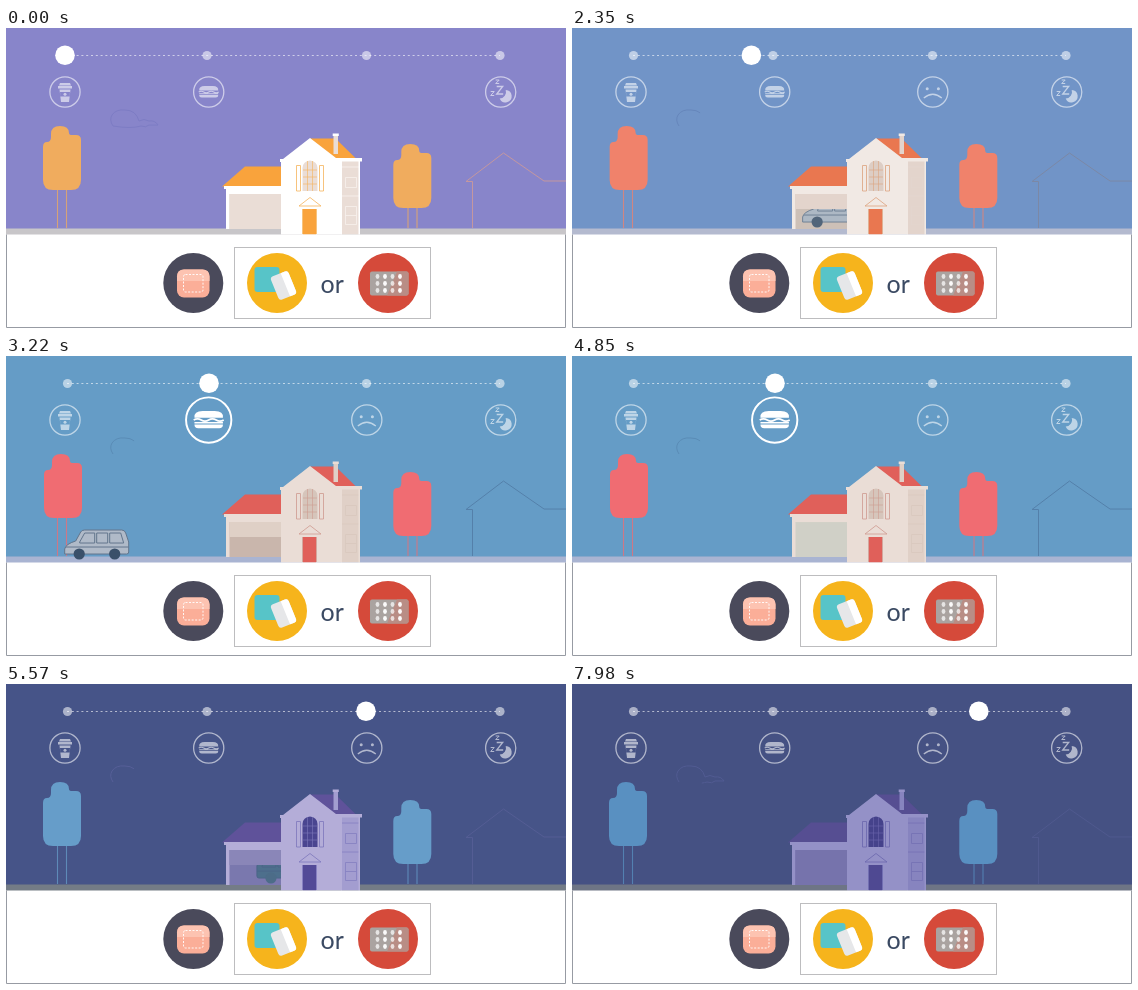
Recreate the animation shown at these times as an HTML page. Size 560 by 300 pixels, loop 8 s.

```html
<!DOCTYPE html>
<html lang="en">
<head>
<meta charset="utf-8">
<title>Day timeline</title>
<style>
html, body { margin: 0; width: 100%; height: 100%; overflow: hidden; }
svg { display: block; width: 100%; height: 100%; }
.sky { fill: var(--sky); }
.tree { fill: var(--tree); }
.trunk { fill: none; stroke: var(--tree); stroke-width: 1.1; opacity: .75; }
.wall { fill: var(--wall); }
.shade { fill: var(--shade); }
.roof { fill: var(--roof); }
.door { fill: var(--door); }
.win { fill: var(--win); }
.trim { fill: none; stroke: var(--line); stroke-width: .8; }
.side { fill: none; stroke: var(--side); stroke-width: .8; }
.ground { fill: var(--ground); }
.far { fill: none; stroke: var(--far); }
.cloud { fill: none; stroke: var(--cloud); }
.panel { fill: var(--panel); }
.inside { fill: var(--inside); }
.body { fill: var(--car); stroke: var(--edge); }
.glass { fill: none; stroke: var(--edge); }
.tyre { fill: var(--tyre); }
.icon { fill: #fff; }
.ring, .ln { fill: none; stroke: #fff; stroke-width: 1.3; }
</style>
</head>
<body>
<svg id="stage" viewBox="0 0 560 300" preserveAspectRatio="none">
  <defs>
    <path id="crown" class="tree" d="M45 106Q45 98 54 98T63 105Q63 107 66 107H70Q75 107 75 112V152Q75 162 65 162H47Q37 162 37 152V119Q37 114 41 114T45 109z"/>
    <linearGradient id="glow">
      <stop offset="0" stop-color="#fff" stop-opacity=".75"/>
      <stop offset="1" stop-color="#fff" stop-opacity=".3"/>
    </linearGradient>
    <clipPath id="road"><path d="M0 0H300V300H0z"/></clipPath>
  </defs>

  <rect class="sky" width="560" height="300"/>
  <path class="cloud" id="cloud" pathLength="100" d="M107 98q-4-6-1-11q4-6 13-5q11 0 14 11q5-3 10 0q6-1 9 4H143q-3 3-8 1q-10 3-28 0z"/>
  <path class="far" d="M560 153H538L497.500 125L460 153.500H466.500V200"/>

  <rect class="ground" y="200.500" width="560" height="7"/>
  <path class="trunk" d="M51.500 160V200M60.500 160V200M402 178V200M411 178V200"/>
  <use href="#crown" id="leftTree"/>
  <use href="#crown" x="350.300" y="18"/>

  <path class="wall" d="M220 157H276V201H220z"/>
  <rect class="inside" x="223.500" y="166" width="52" height="35"/>
  <g clip-path="url(#road)">
    <g id="car">
      <g id="turn">
        <path id="beam" fill="url(#glow)" d="M2 16L-54 6V26L2 20z"/>
        <path class="body" d="M1 25V20Q2 15 12 12L17 3Q18 1 21 1H58Q61 1 62 4L65 13V23Q65 25 63 25z"/>
        <path class="glass" d="M16 13L21 4H31V14H16zM33 4H44V14H33zM46 4H57L60 14H46zM2 18H65"/>
        <circle class="tyre" cx="15.500" cy="25" r="5.600"/>
        <circle class="tyre" cx="51" cy="25" r="5.600"/>
      </g>
    </g>
  </g>
  <rect class="panel" id="shutter" x="223.500" y="166" width="52" height="35"/>
  <path class="roof" d="M216 158.500L239 138.500H276V158.500z"/>
  <path class="wall" d="M218 158H276V161H218z"/>

  <path class="shade" d="M335 131H354V206.500H335z"/>
  <path class="side" d="M339.500 149.500H350.500V159.500H339.500zM339.500 178.500H350.500V196.500H339.500zM339.500 187.500H350.500M336 139H354M336 168H354"/>
  <path class="roof" d="M304 110.500H329.500L350.500 131H326z"/>
  <path class="shade" d="M327.500 107H332V126H327.500z"/>
  <path class="wall" d="M326.700 105.500H332.800V108H326.700z"/>
  <path class="wall" d="M304 110L330 130H356V133.500H354V206.500H352.500V133.500H336V206.500H275V134H274V131H277z"/>
  <path class="win" d="M296.500 163V140Q297 133 304 132.500Q311 133 311.500 140V163z"/>
  <path class="trim" style="stroke-width:.6" d="M301.500 133V163M306.500 133V163M297 142H311M297 149H311M297 156H311"/>
  <path class="trim" d="M290.500 137.500H294.500V163H290.500zM313.500 137.500H317.500V163H313.500z"/>
  <path class="trim" d="M293 178L304 169.500L315 178zM296.500 181V206M310.500 181V206"/>
  <rect class="door" x="297" y="181" width="13" height="25.500"/>

  <g id="timeline">
    <path d="M61 27.500H494" fill="none" stroke="#fff" stroke-opacity=".6" stroke-dasharray="2 2.800"/>
    <g fill="#fff" fill-opacity=".55">
      <circle cx="61.500" cy="27.500" r="4.600"/><circle cx="201" cy="27.500" r="4.600"/>
      <circle cx="360.500" cy="27.500" r="4.600"/><circle cx="494" cy="27.500" r="4.600"/>
    </g>
    <circle id="knob" cy="27.300" r="9.800" fill="#fff"/>
  </g>

  <g id="coffee" class="icon">
    <circle class="ring" r="15.100"/>
    <path d="M-5-9H5L6-6.500H-6zM-7-6H7V-3.500H-7z"/>
    <path fill-rule="evenodd" d="M-5.500-2.500H5.500L4 10H-4zM-5 0L-4.600 4.500H4.600L5 0z"/>
    <circle cy="2.200" r="1.500"/>
  </g>
  <g id="burger" class="icon">
    <circle class="ring" r="15.100"/>
    <path d="M-9.500-1.500Q-10-6-4-6H4Q10-6 9.500-1.500zM-9.500 3H9.500Q9.500 5.500 7 5.500H-7Q-9.500 5.500-9.500 3z"/>
    <path class="ln" style="stroke-width:1.100" d="M-10 0Q-7.500-1.500-5 0T0 0T5 0T10 0M-9.500 1.800H9.500"/>
  </g>
  <g id="sad" class="icon">
    <circle class="ring" r="15.100"/>
    <circle cx="-5.600" cy="-3.300" r="1.500"/><circle cx="5.600" cy="-3.300" r="1.500"/>
    <path class="ln" d="M-9 6Q0-1.500 9 6"/>
  </g>
  <g id="sleep" class="icon">
    <circle class="ring" r="15.100"/>
    <path d="M5-2A6.200 6.200 0 1 1-1 6.500A6.500 6.500 0 0 0 5-2z"/>
    <path class="ln" d="M-4-5.500H2L-4 2H2.500"/>
    <path class="ln" style="stroke-width:1" d="M-10-.5H-6.500L-10 3.500H-6.500M-5-12H-1.500L-5-8.500H-1.500"/>
  </g>

  <path d="M0 206.500H560V300H0z" fill="#fff"/>
  <path d="M.5 206.500V299.500H559.500V206.500" fill="none" stroke="#979ba3"/>
  <rect x="228.500" y="219.500" width="196" height="71" fill="none" stroke="#bdbdbf"/>
  <circle cx="187.300" cy="255" r="30" fill="#4a4a5b"/>
  <rect x="171" y="241.500" width="32.500" height="28" rx="7" fill="#fbae98"/>
  <path d="M171 253V248.500Q171 241.500 178 241.500H196.500Q203.500 241.500 203.500 248.500V253z" fill="#fdc3b1"/>
  <rect x="177.500" y="246.500" width="19.500" height="17.500" rx="2" fill="none" stroke="#fff" stroke-width=".9" stroke-dasharray="2 1.500"/>
  <circle cx="271" cy="255" r="30" fill="#f6b41c"/>
  <rect x="248.500" y="239" width="25" height="25" rx="3" fill="#57c4c8"/>
  <g transform="translate(277.500 257.500) rotate(-22)">
    <rect x="-9.500" y="-12.500" width="19" height="25" rx="3" fill="#e6e7e9"/>
    <path d="M2-12.500H6.500Q9.500-12.500 9.500-9.500V9.500Q9.500 12.500 6.500 12.500H2z" fill="#fff"/>
  </g>
  <text x="314.500" y="264.500" font-family="Lato, Open Sans, sans-serif" font-size="25" fill="#3b4a63">or</text>
  <circle cx="382" cy="255" r="30" fill="#d54a3a"/>
  <rect x="364" y="243.500" width="38.500" height="24" rx="2" fill="#aaa3a0"/>
  <path d="M391 243.500H400.500Q402.500 243.500 402.500 245.500V265.500Q402.500 267.500 400.500 267.500H381z" fill="#b98d85"/>
  <g id="pills" fill="#fff"></g>
</svg>
<script>
const LOOP = 8000;
const $ = id => document.getElementById(id);
const stage = $('stage');

const clamp = v => Math.max(0, Math.min(1, v));
const linear = p => p;
const inOut = p => p < .5 ? 4 * p ** 3 : 1 - 4 * (1 - p) ** 3;
const mix = (a, b, p) => a + (b - a) * p;

// keys: time, value, time, value, ...
function track(t, keys, ease = linear) {
  let v = keys[1];
  for (let i = 2; i < keys.length; i += 2) {
    if (t < keys[i - 2]) break;
    v = mix(keys[i - 1], keys[i + 1], ease(clamp((t - keys[i - 2]) / (keys[i] - keys[i - 2]))));
  }
  return v;
}

// morning, noon, evening, night
const palette = {
  sky: '8885ca 659cc6 465488 434e7e',
  tree: 'f0ac5e f06c72 669dc9 4a80b8',
  wall: 'ffffff eaddd6 b4add8 6f70b4',
  shade: 'eaddd6 e0d0c7 a39dd0 6668ac',
  roof: 'f9a33c e0605a 5f529a 4b4988',
  door: 'f9a33c e0605a 534a97 4a478c',
  win: 'eaddd6 d6c5bb 4a4590 3f3f85',
  line: 'f5b45c cf9a90 7d77bb 55539a',
  side: 'f8f2ee d9c8be 857fc0 605fa4',
  ground: 'c8c6c9 a9b4d2 747c86 686c84',
  far: 'c4979f 5480aa 545d94 4a5488',
  cloud: '7d7cc4 5a8cb6 565f98 4c568a',
  panel: 'eaddd6 dfd0c6 8a86b8 5f5c9f',
  inside: 'd6d2cb c9b6ac 7a78ae 5f5c9f',
  car: 'a8b4bd b0bac8 4d6f8c 4d6f8c',
  edge: '8a9aa8 62758c 4a6488 4a6488',
  tyre: '7f8c99 3a506a 4c6c88 4c6c88'
};
const rgb = hex => [0, 2, 4].map(i => parseInt(hex.slice(i, i + 2), 16));
const colours = Object.entries(palette).map(([name, list]) => [name, list.split(' ').map(rgb)]);
const litGarage = rgb('d0d0c7');
const blend = (a, b, p) => a.map((v, i) => mix(v, b[i], p));

const icons = [
  ['coffee', 59, [30, 0, 300, 1, 1840, 1, 2140, 0]],
  ['burger', 202.700, [2620, 0, 2920, 1, 4850, 1, 5150, 0]],
  ['sad', 360.800, [5630, 0, 5950, 1, 7620, 1, 7920, 0]],
  ['sleep', 494.700, [0, 0]]
];

let pills = '';
for (let r = 0; r < 3; r++)
  for (let c = 0; c < 4; c++)
    pills += `<ellipse cx="${371.500 + c * 7.500}" cy="${248.500 + r * 7}" rx="1.900" ry="2.400" opacity="${c % 2 ? .95 : .7}"/>`;
$('pills').innerHTML = pills;

function drawColours(t) {
  const phase = track(t, [1840, 0, 2620, 1, 4850, 1, 5520, 2, 7620, 2, 8400, 3]);
  const i = Math.min(2, Math.floor(phase));
  for (const [name, c] of colours) {
    let value = blend(c[i], c[i + 1], phase - i);
    if (name === 'inside') value = blend(value, litGarage, track(t, [3430, 0, 3730, 1, 4850, 1, 5300, 0]));
    stage.style.setProperty('--' + name, `rgb(${value.map(Math.round)})`);
  }
  $('leftTree').setAttribute('x', track(t, [1840, 0, 2620, 1, 4850, 1, 5240, 0]));
}

function drawCar(t) {
  const back = t > 4300;
  const p = clamp(back ? (t - 4880) / 800 : (t - 2200) / 1550);
  const x = back ? mix(-70, 256, 1 - (1 - p) ** 2) : 247 - 319 * p ** 1.250;
  const y = 173 - 4 * clamp((x - 150) / 80);
  const car = $('car');
  car.setAttribute('transform', `translate(${x} ${y})`);
  car.style.display = (t > 2050 && t < 3760) || (t > 4880 && t < 6100) ? '' : 'none';
  $('turn').setAttribute('transform', back ? 'translate(66 0) scale(-1 1)' : '');
  $('beam').setAttribute('opacity', back ? track(t, [4900, 0, 5100, 1, 5500, 1, 5750, 0]) : 0);
  const bottom = track(t, [2050, 201, 2350, 181, 3430, 181, 3730, 166, 4850, 166, 5100, 181, 5660, 181, 6050, 201]);
  $('shutter').setAttribute('height', bottom - 166);
}

function draw(t) {
  drawColours(t);
  drawCar(t);
  $('knob').setAttribute('cx', track(t, [1840, 59, 2620, 203, 4850, 203, 5450, 360, 7635, 360, 8415, 494], inOut));
  for (const [id, x, keys] of icons) {
    const on = track(t, keys, inOut);
    $(id).setAttribute('transform', `translate(${x} 64) scale(${1 + .5 * on})`);
    $(id).setAttribute('opacity', mix(.58, 1, on) * (id === 'sad' ? track(t, [30, 0, 300, 1]) : 1));
  }
  const drawn = track(t, [1840, 100, 2350, 32, 7620, 32, 7980, 80]);
  $('cloud').setAttribute('stroke-dasharray', `${drawn} 100`);
}

function frame(now) {
  draw(now % LOOP);
  requestAnimationFrame(frame);
}
draw(0);
requestAnimationFrame(frame);
</script>
</body>
</html>
```
